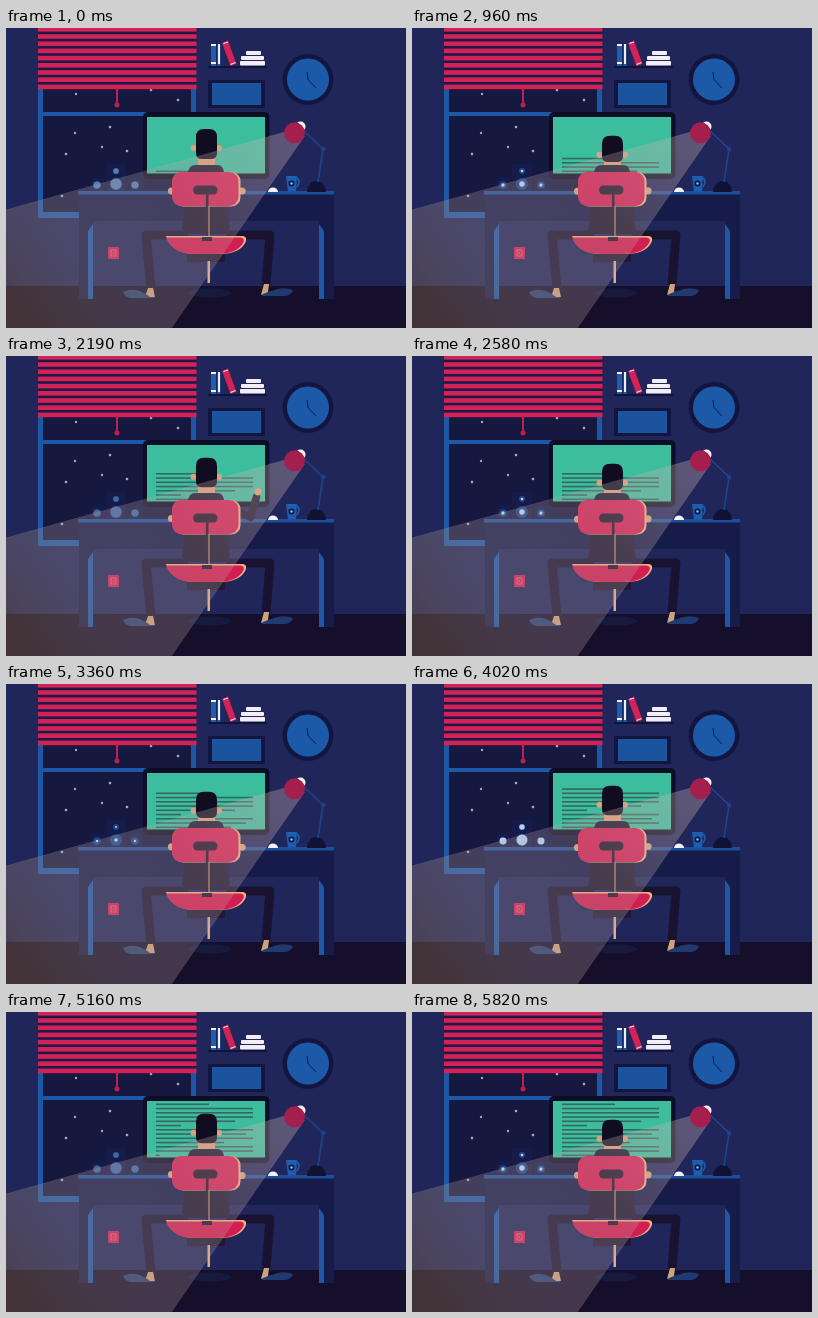
An HTML page that plays this animation: 400 by 300 pixels, repeating every 5.85 s.

```html
<!DOCTYPE html>
<html lang="en">
<head>
<meta charset="utf-8">
<title>Night desk</title>
<style>
html, body { margin: 0; width: 100%; height: 100%; overflow: hidden; background: #20265a; }
svg { display: block; width: 100vw; height: 100vh; }
</style>
</head>
<body>
<svg viewBox="0 0 400 300">
  <defs>
    <linearGradient id="beam" gradientUnits="userSpaceOnUse" x1="288" y1="105" x2="20" y2="290">
      <stop offset="0" stop-color="#d8b8b0" stop-opacity=".34"/>
      <stop offset=".4" stop-color="#c0a6a8" stop-opacity=".26"/>
      <stop offset=".72" stop-color="#b49c9c" stop-opacity=".29"/>
      <stop offset="1" stop-color="#84694c" stop-opacity=".4"/>
    </linearGradient>
    <clipPath id="screenClip"><path d="M141 89H259V145.500H141Z"/></clipPath>
  </defs>

  <path fill="#20265a" d="M0 0H400V300H0Z"/>
  <path fill="#160f2b" d="M0 258H400V300H0Z"/>

  <!-- window -->
  <path fill="#15183f" d="M32 56H190V190H32Z"/>
  <g id="stars" fill="#f2f4ff"></g>
  <path fill="#1c58a6" d="M32 60H37V190H32ZM185 60H190V190H185ZM32 84H190V88H32ZM32 184H190V190H32Z"/>
  <path fill="#191a48" d="M32 0H190.500V60H32Z"/>
  <g id="blinds" fill="#d22258"></g>
  <path stroke="#c2204f" stroke-width="2" d="M111 60V76"/>
  <circle cx="111" cy="77" r="2.500" fill="#c2204f"/>

  <!-- shelf, picture, clock -->
  <path fill="#10133a" d="M202 38H261V40H202Z"/>
  <path fill="#1c5fb0" d="M205 16H210V38H205ZM211.500 16H214.500V38H211.500Z"/>
  <path fill="#f1eef6" d="M205 16H210V18H205ZM205 34H210V36H205ZM212 16H214V36H212Z"/>
  <path fill="#d22258" d="M216 15 222 12.500 230.500 36 224.500 38Z"/>
  <path stroke="#f4dce4" stroke-width="1.200" d="M217.500 15.500 222 14M224.500 36.500 229.500 34.500"/>
  <g fill="#f1eef6">
    <rect x="240" y="23" width="15" height="4" rx="1"/>
    <rect x="235" y="28" width="23" height="4" rx="1"/>
    <rect x="234" y="33" width="25" height="4.500" rx="1"/>
  </g>
  <path fill="#12163f" d="M202 52H259V80H202Z"/>
  <path fill="#1c539f" d="M206 55H255V77H206Z"/>
  <circle cx="302" cy="51.500" r="25.500" fill="#12163f"/>
  <circle cx="302" cy="51.500" r="21" fill="#1c5aa9"/>
  <path d="M301 44 302 51.500 310 60" fill="none" stroke="#12163f" stroke-width="1"/>

  <!-- monitor -->
  <rect x="137" y="84" width="126.500" height="67" rx="5" fill="#0d0e25"/>
  <path fill="#3cbd9e" d="M141 89H259V145.500H141Z"/>
  <g id="lines" fill="#356860" clip-path="url(#screenClip)"></g>

  <!-- speakers -->
  <path fill="#161b49" d="M100 136H120V164H100ZM85 150H98V164H85ZM123 150H136V164H123Z"/>
  <g id="cones"></g>

  <!-- desk -->
  <path fill="#171b49" d="M73 164H328V193H73ZM73 193H87V271H73ZM313 193H328V271H313Z"/>
  <path fill="#1c4f9a" d="M72 163H328V166.500H72Z"/>
  <path fill="#1c58a6" d="M82 271V203L87 196V271ZM318 271V203L313 196V271Z"/>
  <rect x="102" y="219" width="11" height="12" rx="1" fill="#d22258"/>
  <path d="M105 222H110V228H105ZM107.500 224V226" fill="none" stroke="#ef7890" stroke-width=".7"/>

  <!-- desk objects -->
  <path d="M262 164A5 4.500 0 0 1 272 164Z" fill="#f4f1f8"/>
  <path fill="#1c5fb0" d="M280 148H291L290 163.500H282Z"/>
  <path d="M291 150Q295 153 291 159" fill="none" stroke="#1c5fb0" stroke-width="1.600"/>
  <circle cx="285.500" cy="155.500" r="3" fill="#11153b"/>
  <circle cx="285.500" cy="155.500" r="1.200" fill="#8fc4ee"/>
  <path d="M301 164A9.500 11 0 0 1 320 164Z" fill="#0f1233"/>
  <path d="M297 102 317 121 312 154" fill="none" stroke="#1e438a" stroke-width="1.600"/>
  <circle cx="317" cy="121" r="2.200" fill="#1e438a"/>

  <!-- legs and chair base -->
  <ellipse cx="204" cy="265" rx="21" ry="4.500" fill="#151a3e"/>
  <g fill="none" stroke="#191331" stroke-width="9" stroke-linejoin="round">
    <path d="M182 207H140L145 261"/>
    <path id="rightLeg"/>
  </g>
  <path fill="#26406f" d="M117 264Q128 259 138 265L148 267V270H124Q118 268 117 264Z"/>
  <path fill="#cfa27c" d="M142 260H147L149 269H144L140 266Z"/>
  <g id="rightFoot">
    <path fill="#223a72" d="M287 262Q276 258 266 263L256 265V268H280Q286 266 287 262Z"/>
    <path fill="#cfa27c" d="M258 256H263L262 264 255 267Z"/>
  </g>

  <!-- person -->
  <g fill="none" stroke="#1c172f" stroke-width="7.500" stroke-linejoin="round" stroke-linecap="round">
    <path id="leftArm"/>
    <path id="rightArm"/>
  </g>
  <circle id="leftHand" r="3.600" fill="#d9a27e"/>
  <circle id="rightHand" r="3.600" fill="#d9a27e"/>
  <path fill="#d9a27e" d="M192 122H209V141H192Z"/>
  <path fill="#1c172f" d="M182 146Q182 137 190 137H211Q218 137 218 146L224 206H176Z"/>
  <g id="head">
    <circle cx="187.500" cy="120" r="3" fill="#d9a27e"/>
    <circle cx="213" cy="120" r="3" fill="#d9a27e"/>
    <path id="hair" fill="#100d20"/>
  </g>

  <!-- chair -->
  <path fill="#211933" d="M181 225H219V234H181Z"/>
  <path fill="#e0ad85" d="M201.500 233H204V255H201.500Z"/>
  <rect x="168" y="144" width="66.500" height="34.500" rx="9" fill="#eeb083"/>
  <rect x="166" y="144" width="66.500" height="34" rx="9" fill="#d22254"/>
  <rect x="187" y="157.500" width="24.500" height="9" rx="4.500" fill="#22152b"/>
  <path stroke="#22152b" stroke-width="2.600" d="M201.200 165V211"/>
  <path stroke="#d9a27e" stroke-width="1" d="M203 178V209"/>
  <path fill="#eeb083" d="M160 208H236Q241 208 240 213Q235 226 213 226H190Q166 226 160 208Z"/>
  <path fill="#d01f50" d="M160 209.500H234Q239 210 237.500 214Q232 226 211 226H190Q166 226 160 209.500Z"/>
  <path fill="#22152b" d="M196 209H206V213H196Z"/>

  <path fill="url(#beam)" stroke="#cdbcc8" stroke-opacity=".12" d="M279 104 -2 182.500V302H164L298.500 108Z"/>

  <!-- lamp head -->
  <circle cx="294.500" cy="98.500" r="5" fill="#f6eef2"/>
  <circle cx="288.500" cy="104.800" r="10.500" fill="#a51f4e"/>
</svg>
<script>
const LOOP = 5850, BEAT = 270;
const LINE_X = 150, LINE_Y = 142.5, PITCH = 4.25;
const lengths = [53, 97, 97, 97, 79, 25, 97, 90, 97, 68, 97, 97, 60];
const starts = [-220, 250, 500, 750, 1150, 1650, 2000, 2750, 3150, 3600, 4100, 4700, 5150];

const $ = id => document.getElementById(id);
const clamp = v => Math.max(0, Math.min(1, v));
const ease = v => v * v * (3 - 2 * v);
const mix = (a, b, k) => a + (b - a) * k;

function set(node, attrs) {
  for (const key in attrs) node.setAttribute(key, attrs[key]);
}
function add(parent, tag, attrs = {}) {
  const node = document.createElementNS('http://www.w3.org/2000/svg', tag);
  set(node, attrs);
  parent.append(node);
  return node;
}

for (let i = 0; i < 9; i++)
  add($('blinds'), 'rect', { x: 32, y: -1 + i * 7.2, width: 158.5, height: 4.6 });

[[70, 66], [145, 62], [172, 72], [69, 105], [104, 99], [60, 126], [96, 119], [121, 123], [56, 168]]
  .forEach(([x, y], i) => {
    const r = i % 3 ? 1.8 : 1.4, c = .5;
    add($('stars'), 'path', {
      d: `M${x} ${y - r}L${x + c} ${y - c} ${x + r} ${y} ${x + c} ${y + c} ${x} ${y + r} ${x - c} ${y + c} ${x - r} ${y} ${x - c} ${y - c}Z`
    });
  });

const rows = lengths.map(() => add($('lines'), 'rect', { x: LINE_X, height: 1.6 }));
const cones = [[91, 157, 3.8], [110, 156, 6], [129, 157, 3.8], [110, 143, 3]].map(([cx, cy, r]) => {
  add($('cones'), 'circle', { cx, cy, r, fill: '#1c4686' });
  return { r, core: add($('cones'), 'circle', { cx, cy, fill: '#c4e4ff' }) };
});

function drawText(t) {
  const current = starts.filter(s => s <= t).length - 1;
  rows.forEach((row, i) => {
    const typed = clamp((t - starts[i]) / (lengths[i] * 2.8));
    set(row, {
      y: LINE_Y - (current - i) * PITCH,
      width: i <= current ? lengths[i] * typed : 0
    });
  });
}

// Each pulse starts as a small bright dot, fills its cone, then fades.
function drawSpeakers(phase) {
  const age = (phase + 2 / 3) % 1;
  const size = mix(.25, .95, ease(clamp(age / .65)));
  const opacity = mix(.95, .22, ease(clamp((age - .52) / .2)));
  cones.forEach(({ r, core }) => set(core, { r: r * size, opacity }));
}

// Rises, holds briefly and falls.
const gesture = (t, from, top, hold, to) =>
  ease(clamp((t - from) / (top - from))) * (1 - ease(clamp((t - hold) / (to - hold))));

function drawArms(phase, lift) {
  const tap = Math.sin(phase * 2 * Math.PI) * .8;
  // Quadratic arc from the keyboard out to the side and up beside the head.
  const arc = (a, b, c) => (1 - lift) ** 2 * a + 2 * lift * (1 - lift) * b + lift ** 2 * c;
  const hx = arc(236, 269, 242.5), hy = arc(163 + tap, 144, 127.5);
  const ex = mix(228, 250, lift), ey = mix(159, 162, lift);
  set($('rightArm'), { d: `M213 146L${ex} ${ey} ${mix(ex, hx, .8)} ${mix(ey, hy, .8)}` });
  set($('rightHand'), { cx: hx, cy: hy });
  set($('leftArm'), { d: `M187 144L174 159 168 ${162 - tap}` });
  set($('leftHand'), { cx: 165.5, cy: 163 - tap });
}

function drawLeg(kick) {
  set($('rightLeg'), { d: `M220 207L${264 + 2 * kick} ${207 - 7 * kick} ${260 + 3 * kick} ${257 - 7 * kick}` });
  set($('rightFoot'), { transform: `translate(${4 * kick} ${-6 * kick}) rotate(${-8 * kick} 259 264)` });
}

function drawHead(phase) {
  const nod = (1 - Math.cos(phase * 2 * Math.PI)) / 2;
  const bottom = 131 - 4 * nod;
  set($('head'), { transform: `translate(0 ${7 * nod})` });
  set($('hair'), {
    d: `M190 109Q190 101 198 101H203Q211 101 211 109V${bottom - 6}Q211 ${bottom} 205 ${bottom}H196Q190 ${bottom} 190 ${bottom - 6}Z`
  });
}

function render(t) {
  const phase = t % BEAT / BEAT;
  const wave = gesture(t, 1700, 2020, 2080, 2420);
  const stretch = gesture(t, 4320, 4600, 4700, 5000);
  drawText(t);
  drawSpeakers(phase);
  drawArms(phase, Math.max(wave, stretch));
  drawLeg(stretch);
  drawHead(phase);
}

let began;
function tick(now) {
  began ??= now;
  render((now - began) % LOOP);
  requestAnimationFrame(tick);
}
render(0);
requestAnimationFrame(tick);
</script>
</body>
</html>
```
